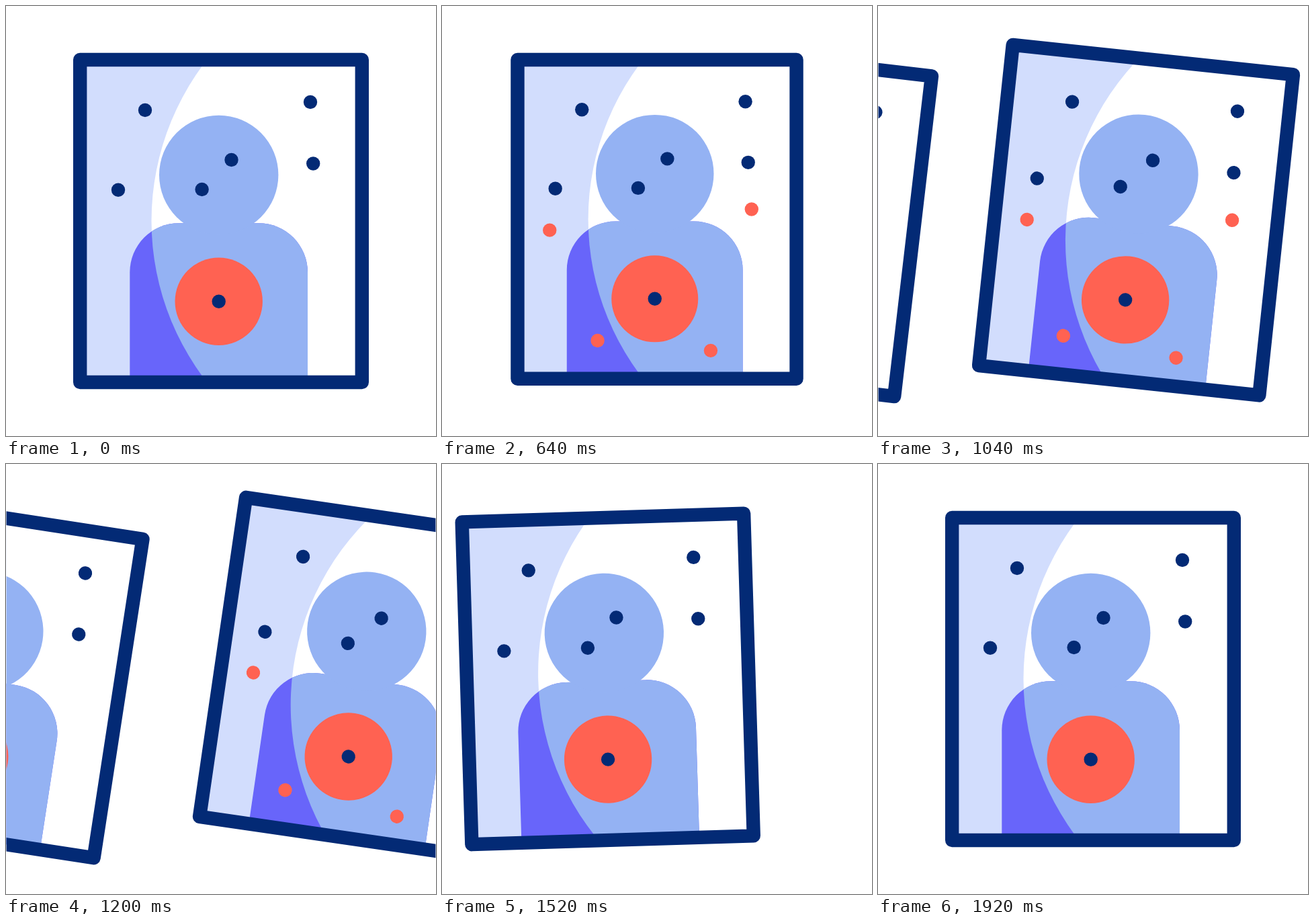
An HTML page with a canvas for the animation above (2 s loop, 640x640 px).

```html
<!DOCTYPE html>
<html lang="en">
<head>
<meta charset="utf-8">
<title>Shooting range</title>
<style>
  html, body { margin: 0; width: 100%; height: 100%; overflow: hidden; background: #fff; }
  canvas { display: block; width: 640px; height: 640px; }
</style>
</head>
<body>
<canvas id="stage" width="640" height="640"></canvas>
<script>
const ctx = document.getElementById('stage').getContext('2d');
const LOOP = 2000, STEP = 40;
const NAVY = '#032a75', RED = '#ff6252', SKY = '#94b2f3', PALE = '#d2ddfd', VIOLET = '#6865fa';
const PIVOT = { x: 320, y: 80 };

const holes = [[207, 155], [453, 143], [457.2, 234.5], [335.5, 229], [291.6, 273], [167, 273.8], [316.7, 439.7]];

// Each shot flies along a quadratic curve: start, control, end, moment of impact.
const FLIGHT = 135, TAIL = 0.085, RECOIL = 130;
const shots = [
  { path: [[-15, 280], [80, 275], [158.5, 336.4]], hit: 350 },
  { path: [[655, 244], [545, 222], [462.3, 305]], hit: 440 },
  { path: [[465, 656], [442, 575], [400.8, 517.6]], hit: 530 },
  { path: [[-15, 455], [130, 430], [230.6, 502.6]], hit: 620 }
];

// Keys are [time, value], eased in and out between neighbours.
const leave = { x: [[838, 0], [1698, 640]], angle: [[838, 0], [1168, 9.1], [1401, -7], [1600, 0]] };
const enter = { x: [[716, -580], [1766, 0]], angle: [[919, 0], [1110, 9.6], [1744, -6.3], [1920, 0]] };

const clamp = v => Math.min(1, Math.max(0, v));
const ease = u => u * u * (3 - 2 * u);

function tween(keys, t) {
  let value = keys[0][1];
  for (let i = 1; i < keys.length; i++) {
    const [t0, a] = keys[i - 1], [t1, b] = keys[i];
    if (t > t0) value = a + (b - a) * ease(clamp((t - t0) / (t1 - t0)));
  }
  return value;
}

function curvePoint([a, b, c], u) {
  const v = 1 - u;
  return [0, 1].map(k => v * v * a[k] + 2 * u * v * b[k] + u * u * c[k]);
}

function fill(color, trace) {
  ctx.fillStyle = color;
  ctx.beginPath();
  trace();
  ctx.fill();
}

const disc = (x, y, r) => () => ctx.arc(x, y, r, 0, 2 * Math.PI);
const sheet = () => ctx.rect(110.2, 80, 419.6, 480);
const body = () => ctx.roundRect(184.3, 323.2, 264.7, 260, [73, 73, 0, 0]);
const glow = disc(606.5, 320, 390);

// Strokes keep their width whatever the scale of the board.
function stroke(color, width, trace) {
  ctx.beginPath();
  trace();
  ctx.save();
  ctx.resetTransform();
  ctx.strokeStyle = color;
  ctx.lineWidth = width;
  ctx.lineCap = ctx.lineJoin = 'round';
  ctx.stroke();
  ctx.restore();
}

function capsule(color, from, to) {
  stroke(color, 20.4, () => {
    ctx.moveTo(...from);
    ctx.lineTo(to[0] + 0.01, to[1]);
  });
}

function drawBoard(x, angle, scale, shotTime) {
  ctx.save();
  ctx.translate(PIVOT.x + x, PIVOT.y);
  ctx.rotate(angle * Math.PI / 180);
  ctx.scale(scale, scale);
  ctx.translate(-PIVOT.x, -PIVOT.y);

  ctx.save();
  ctx.beginPath();
  sheet();
  ctx.clip();
  fill(PALE, sheet);
  fill('#fff', glow);
  fill(VIOLET, body);
  ctx.save();
  ctx.beginPath();
  glow();
  ctx.clip();
  fill(SKY, body);
  ctx.restore();
  fill(SKY, disc(316.7, 251.5, 88.7));
  fill(RED, disc(316.7, 439.7, 65.2));
  ctx.restore();

  stroke(NAVY, 20.4, sheet);
  for (const p of holes) capsule(NAVY, p, p);
  for (const { path, hit } of shots) {
    const u = 1 + (shotTime - hit) / FLIGHT;
    if (u > 0) capsule(RED, curvePoint(path, clamp(u - TAIL)), curvePoint(path, clamp(u)));
  }
  ctx.restore();
}

function recoil(t) {
  return shots.reduce((sum, { hit }) =>
    sum + 0.025 * Math.sin(Math.PI * clamp((t - hit) / RECOIL)) ** 2, 0);
}

function draw(t) {
  ctx.resetTransform();
  ctx.fillStyle = '#fff';
  ctx.fillRect(0, 0, 640, 640);
  ctx.save();
  ctx.beginPath();
  ctx.rect(0.6, 0.6, 638.8, 638.8);
  ctx.clip();
  if (t > enter.x[0][0]) drawBoard(tween(enter.x, t), tween(enter.angle, t), 1, 0);
  if (t < leave.x[1][0]) drawBoard(tween(leave.x, t), tween(leave.angle, t), 1 - recoil(t), t);
  ctx.restore();
}

let start;
function tick(now) {
  start ??= now;
  const t = (now - start + 4) % LOOP;
  draw(Math.floor(t / STEP) * STEP);
  requestAnimationFrame(tick);
}
draw(0);
requestAnimationFrame(tick);
</script>
</body>
</html>
```
